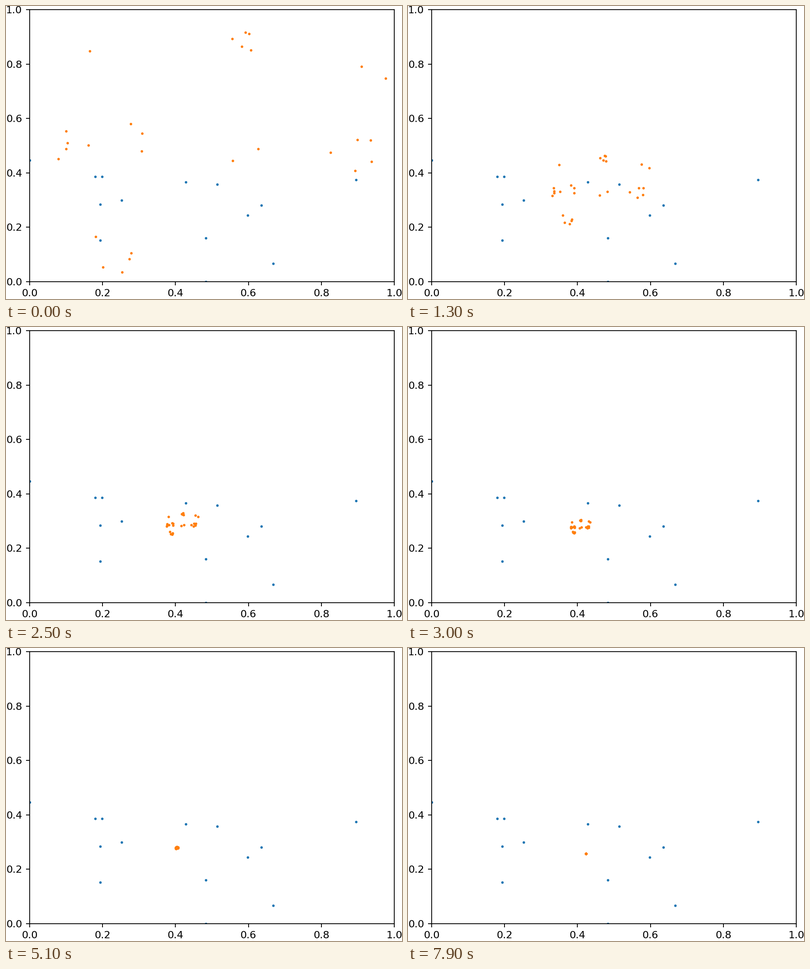
Write a matplotlib script that moves like this. It is 870 px wide and 644 px high and loops after 8000 ms.

```python
import numpy as np
import matplotlib.pyplot as plt
from matplotlib.animation import FuncAnimation

W, H, DPI = 870, 644, 160
LEFT, TOP, RIGHT, BOTTOM = 52, 8, 853, 606
FRAMES, INTERVAL = 80, 100
SHRINK = 0.908  # part of the swarm's size kept per step
SPREAD = 0.07

fixed = np.array([
    (0, .447), (.18, .387), (.199, .387), (.194, .284), (.194, .152),
    (.252, .299), (.428, .367), (.514, .358), (.895, .375), (.636, .281),
    (.598, .244), (.483, .16), (.668, .067), (.483, 0)])

# Loose groups of moving dots: x, y, count
groups = [(.54, .91, 5), (.92, .75, 2), (.87, .46, 5), (.1, .49, 5),
          (.31, .52, 3), (.6, .45, 2), (.22, .1, 5), (.12, .88, 1)]
rng = np.random.default_rng(4)
start = np.vstack([(x, y) + rng.uniform(-SPREAD, SPREAD, (n, 2))
                   for x, y, n in groups])

# Drift of the swarm around the centre of the fixed dots
drift_t = [0, 7, 20, 30, 51, 69, 79]
drift_x = [0, .020, -.002, -.011, -.0065, .024, .0146]
drift_y = [0, -.004, -.004, -.007, .005, -.018, -.015]

home = np.array([.434, .512])
goal = fixed.mean(axis=0)
p, q = (start - home).T
shape = np.column_stack([p, q])
# Distant dots are pulled in more slowly, which bends the shape over time
bend = np.column_stack([p * (.3 * p + .2 * q),
                        .27 * q**2 + .36 * p * (q + .2)])


def swarm(t):
    s = SHRINK**t
    drift = np.array([np.interp(t, drift_t, d) for d in (drift_x, drift_y)])
    centre = goal + (home - goal) * s + drift
    return (centre + s * (shape + (1 - s)**2 * bend)).T


plt.rcParams.update({
    "font.family": "DejaVu Sans", "font.size": 10.1,
    "axes.linewidth": 0.81, "xtick.major.width": 0.81,
    "ytick.major.width": 0.81})
fig = plt.figure(figsize=(W / DPI, H / DPI), dpi=DPI, facecolor="white")
ax = fig.add_axes([LEFT / W, 1 - BOTTOM / H,
                   (RIGHT - LEFT) / W, (BOTTOM - TOP) / H])
ax.set(xlim=(0, 1), ylim=(0, 1))
ax.tick_params(pad=3.9)

ax.plot(*fixed.T, ".", ms=3, color="tab:blue")
dots, = ax.plot(*swarm(0), ".", ms=3, color="tab:orange")


def update(i):
    dots.set_data(*swarm(i))
    return dots,


anim = FuncAnimation(fig, update, frames=FRAMES, interval=INTERVAL,
                     repeat=True, repeat_delay=0)
plt.show()
```
